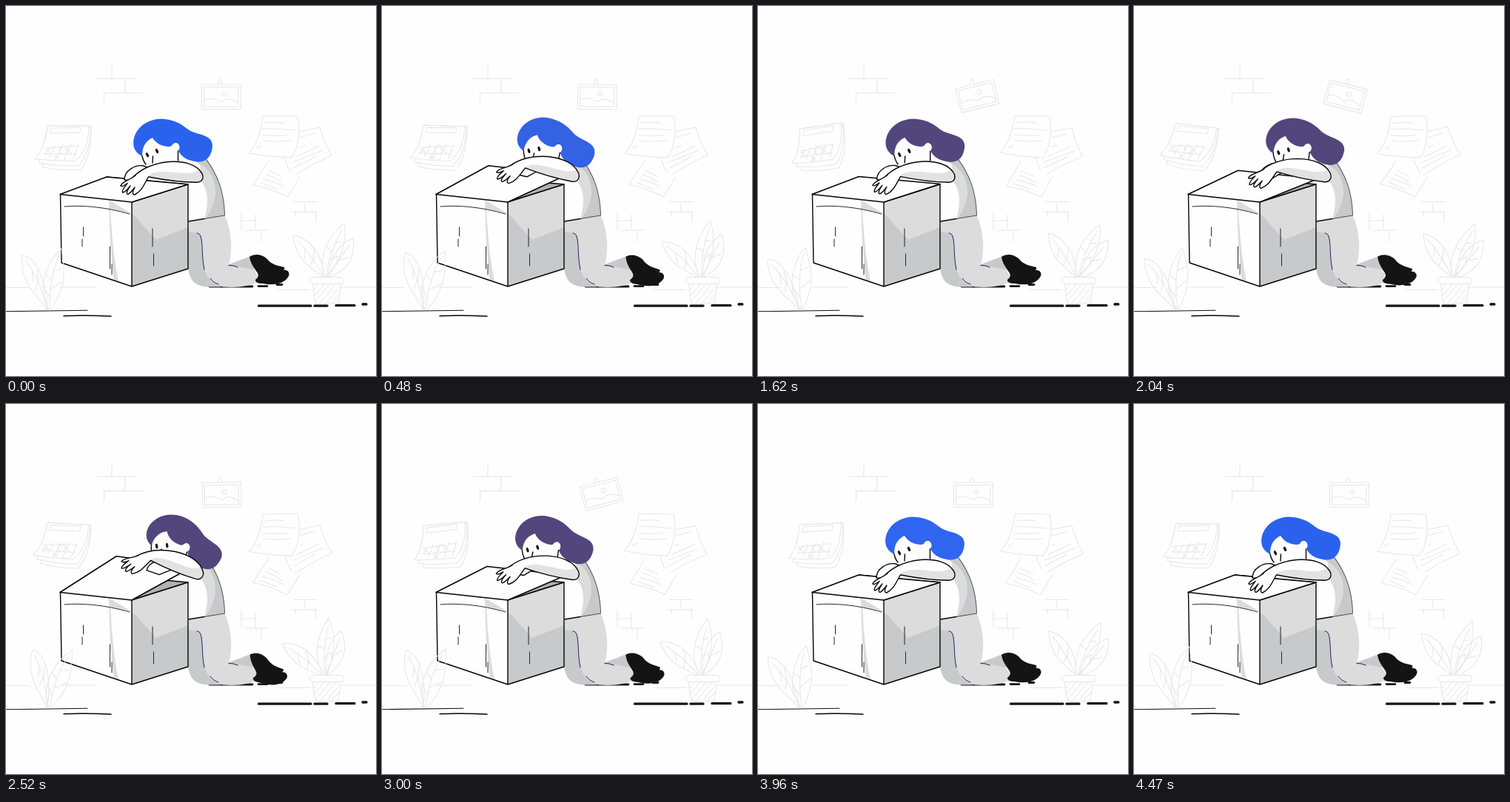
These frames come from a looping animation (500x500 px, 4.53 s). An HTML page:

```html
<!DOCTYPE html>
<html lang="en">
<head>
<meta charset="utf-8">
<title>Resting on a box</title>
<style>
html, body { margin: 0; width: 100%; height: 100%; overflow: hidden; background: #fefefe; }
svg { display: block; width: 100%; height: 100%; }
path, line, circle, rect { stroke-linecap: round; stroke-linejoin: round; }
.faint { fill: none; stroke: #e6e6e6; stroke-width: 1; }
.sheet { fill: #fefefe; }
.ink { fill: none; stroke: #050505; stroke-width: 1.4; }
.thin { fill: none; stroke: #111; stroke-width: .9; }
.white { fill: #fefefe; }
.light { fill: #dcdcdc; stroke: none; }
.dark { fill: #c8c9cb; stroke: none; }
.crease { fill: none; stroke: #1d1768; stroke-width: 1; }
.thick { fill: none; stroke: #151515; stroke-width: 3.3; }
</style>
</head>
<body>
<svg viewBox="0 0 500 500">
  <!-- wall and floor -->
  <g class="faint">
    <path d="M123 98H176M143 80V98M161 98V117M185 117.5H132.500V131"/>
    <path d="M389 264.5H420M404 264.5V278M385 278H420M391 278V284M418.500 278V290"/>
    <path d="M318 280V302M318 290H338M337 282V303M323 303H354M345 303V319"/>
    <path d="M0 380.500H31M74 380H123M367 383.500H410M455 380H500"/>
  </g>

  <g id="calendar" class="faint">
    <path class="sheet" d="M57 162H115C116 188 111 209 101 221.500Q75 223 50 218Z"/>
    <path class="sheet" d="M57 162H114C115 186 108 205 98 216Q70 217 45 212Z"/>
    <path class="sheet" d="M56 162H112C112 185 104 201 94 209Q65 210 39 206.500C49 197 54 180 56 162Z"/>
    <path d="M61 165L101 164L100 171L59 172Z"/>
    <path d="M53 192L98 189M51 200L95 200M66 189L59 204M77 187L66 208M88 187L79 208M98 188L91 206"/>
    <path d="M53 193L60 199M59 192L52 200M66 202L72 208M73 202L66 208M82 192L88 199"/>
    <circle cx="77" cy="195" r="5"/>
  </g>

  <g id="picture" class="faint">
    <path d="M286 106L288 100Q290 97 291 101L292 106"/>
    <rect class="sheet" x="265" y="106" width="52.500" height="33.500"/>
    <rect x="268" y="109.500" width="46" height="26.500"/>
    <circle cx="295" cy="118.500" r="3"/>
    <path d="M268 127Q277 123 285 127T297 126Q305 125 314 131"/>
  </g>

  <g class="faint">
    <g id="page2">
      <path class="sheet" d="M395 170L424 164Q430 185 440 202Q412 214 388 230Q381 220 377 207Z"/>
      <path d="M397 178L417 172M397 191L404 188M392 204L423 189M388 211L428 195M388 219L419 203"/>
    </g>
    <g id="page1">
      <path class="sheet" d="M347 149Q372 148 394 149C399 170 394 194 386 205Q355 204 328 199C340 186 345 167 347 149Z"/>
      <path d="M350 158Q363 156 376 158M347 166Q368 165 391 168M347 174Q363 177 381 174M348 182Q367 184 384 182M339 190L341 193L345 188"/>
    </g>
    <g id="page3">
      <path class="sheet" d="M355 209L334 242Q358 246 381 258L397 231"/>
      <path d="M355 222L372 230M352 228Q364 231 373 239M348 234Q362 237 376 244M345 239L366 247"/>
    </g>
  </g>

  <g class="faint">
    <g id="plantR">
      <path d="M430 367C414 355 392 345 388 310C410 313 428 335 430 367ZM430 366C421 332 440 308 457 293C461 318 454 345 432 366M434 367C439 336 453 320 469 314C473 342 459 360 434 367"/>
      <path d="M430 367Q413 337 394 317M404 328L403 342M415 342L411 352M416 326L416 344M432 366Q438 330 454 303M445 320L453 319M441 332L433 326M438 343L449 338M434 367Q449 345 464 323M451 343L463 340M448 349L447 337"/>
    </g>
    <rect class="sheet" x="410.500" y="366.500" width="46" height="9" rx="4"/>
    <path class="sheet" d="M414 376L418 401Q433 404 449 401L453 376Z"/>
    <path d="M415 384L421 377M417 391L429 377M418 399L437 377M424 402L445 377M432 402L451 380M440 402L450 389"/>
  </g>

  <!-- ground strokes -->
  <path class="thin" style="stroke-width:1.100" d="M0 412.800L110 411.300"/>
  <path class="ink" d="M78 418.700Q110 417.500 142 419.300"/>
  <path class="thick" d="M341.500 405.200H412M417 405.200H434M446 404.700H471M482 403H487"/>
  <path class="thick" style="stroke-width:2.800" d="M275 379H333M341 378.600H353M366 376.500H373"/>

  <!-- legs and torso -->
  <path class="dark" d="M246 291H266L272 352L290 379.500H272C255 379 246 369 246 350Z"/>
  <path class="dark" d="M296 351L331 338L336 357L305 372Z"/>
  <path class="light" d="M246 291L296 283C306 309 306 333 301 350L335 356L344 371C330 379 312 381 294 379.500C276 377 267 362 265 340C264 318 264 309 259 307L246 305Z"/>
  <path class="crease" d="M258 307C268 306 263 333 268 356M276 368Q280 374 287 376M301 350.500Q307 350 313 353"/>
  <path class="white" d="M236 205H270C288 230 295 258 295.500 283L247 291V241L230 230Z"/>
  <path class="dark" d="M250 205L272 207C288 230 295 256 295.500 283L268 288C286 268 286 239 268 218Z"/>
  <path class="light" d="M262 213C290 230 288 266 268 288C274 268 274 249 263 236Z"/>
  <path class="thin" style="stroke-width:.700" d="M270 207C288 230 295 256 295.500 283L268 287.500"/>
  <path class="ink" d="M247 291L268 287.500"/>
  <path id="foot" fill="#141414" d="M329 339C337 334 345 336 352 341C359 350 368 351 376 353C377 355 376 356 375 357C381 356 384 361 382 365C376 376 361 378 347 375C340 375 337 373 337 370C342 366 342 363 338 358C333 351 330 346 329 339Z"/>

  <!-- box -->
  <path class="ink" style="fill:#b0b0b0" d="M170 265L246 241L136 231Z"/>
  <path class="white" d="M73 254.500L170 265V379L75 347Z"/>
  <path class="light" d="M139 262L169 280L141 274C143 310 146 345 152 372L146 370C141 340 140 300 139 262Z"/>
  <path class="dark" d="M170 265L246 241V355L170 379Z"/>
  <path class="light" d="M170 265L246 241V299L203 316L170 280Z"/>
  <path class="ink" d="M73.500 254.500L75 347L170 379L246 355V241L170 265V379"/>
  <path class="thin" d="M79 271C102 269 132 271 167 281"/>
  <path class="thin" d="M104.500 299V311M103 315V325M140.500 325V355M143 349V363M198 301V325M199.500 335V351"/>
  <path id="lid" class="ink" style="fill:#fefefe;stroke-width:1.600"/>

  <!-- head -->
  <g id="head">
    <path class="white" d="M184 196L190 216L233 212V184L198 176Z"/>
    <path class="ink" d="M183.500 201Q185 209 189 214M232.500 196V209M198.500 203L198 212"/>
    <path id="hair" d="M184 203C173 198 169.500 187 174 175C180 160 195 152.500 210 152.500C225 153 235 158 245 166C256 175 279 172 279 189C278 204 270 211.500 258 210.500C246 209 238 205 233 196C236 190 233 185 229 185C225 186 226 190 220 190C210 190 202 185 198 178C190 182 184 188 184 203Z"/>
    <path fill="#fefefe" d="M224 190C225 184 233 183 234.500 190C235 195 231 197 225 195Z"/>
    <ellipse cx="191" cy="201.300" rx="1.700" ry="3.300" transform="rotate(-24 191 201.300)" fill="#111"/>
    <ellipse cx="204" cy="196" rx="1.700" ry="3.300" transform="rotate(-24 204 196)" fill="#111"/>
  </g>

  <!-- arms -->
  <g id="arm">
    <path id="farArm" class="ink" style="fill:#fefefe" d="M160 235C160 222 175 214 186 216Q192 218 196 222L178 236Z"/>
    <path fill="#fefefe" d="M170 233C180 222 195 213 220 210.500C240 209 257 214 264 225C268 231 266 238 258 238.300C236 238 213 235 191 231Z"/>
    <path class="light" style="fill:#e2e2e2" d="M191 231C200 219 228 226 244 226Q255 226 261 221C268 230 266 238 258 238.300C236 238 213 235 191 231Z"/>
    <path class="ink" d="M170 233C180 222 195 213 220 210.500C240 209 257 214 264 225C268 231 266 238 258 238.300C236 238 213 235 193 231"/>
    <path class="ink" style="fill:#fefefe" d="M175 229C166 236 157 237 155 243Q157 245 164 239.500C160 245 156 249 157.500 252Q161 252 168 243C163 250 162 254 165 254.500Q169 252 174 245C170 251 171 255.500 174 255C184 250 187 240 192.500 231"/>
  </g>

  <g id="plantL" class="faint">
    <path d="M55 410C47 394 18 378 22 337C42 340 54 370 56 410M58 410C41 382 55 345 75 328C80 358 82 378 61 410"/>
    <path d="M56 410Q46 370 26 344M36 357L36 372M43 371L40 384M42 355L44 373M59 410Q58 366 72 336M64 358L75 355M61 370L53 362M60 383L75 373M59 393L50 380"/>
  </g>
</svg>
<script>
const LOOP = 4530;
const $ = id => document.getElementById(id);
const mix = (a, b, k) => a + (b - a) * k;
const ease = k => (1 - Math.cos(Math.PI * k)) / 2;

// The pair of [time, value] stops around time t, and the progress between them.
function span(t, stops) {
  let i = 0;
  while (i < stops.length - 2 && t >= stops[i + 1][0]) i++;
  const [a, from] = stops[i], [b, to] = stops[i + 1];
  return { from, to, k: Math.min(1, Math.max(0, (t - a) / (b - a))) };
}
function along(t, stops) {
  const s = span(t, stops);
  return mix(s.from, s.to, ease(s.k));
}
function tint(t) {
  const s = span(t, hairStops);
  return `rgb(${s.from.map((c, i) => Math.round(mix(c, s.to[i], s.k)))})`;
}
const move = (id, value) => $(id).setAttribute('transform', value);
const turn = (id, deg, x, y) => move(id, `rotate(${deg} ${x} ${y})`);

const blue = [42, 98, 238], violet = [82, 70, 124];
const hairStops = [[0, blue], [400, blue], [990, [111, 101, 156]], [1500, violet],
  [3000, violet], [3500, [52, 104, 240]], [4470, blue], [LOOP, blue]];
const pictureStops = [[350, 0], [950, 7.5], [1560, -15], [2100, 15.5], [2900, -15], [3800, 0]];
const calendarStops = [[200, 0], [920, 6], [1570, -8.2], [2120, 7], [3350, -8], [4350, 0]];
const sway = (t, hi, lo) => along(t, [0, hi, lo, hi, lo, 0].map((v, i) => [i * LOOP / 5, v]));

function draw(t) {
  const lift = t < 3400 ? 1.03 * ease(t / 850) : 0;
  const swing = along(t, calendarStops);

  turn('picture', along(t, pictureStops), 290, 101);
  turn('calendar', swing, 85, 161);
  turn('page1', -.15 * swing, 372, 149);
  turn('page2', -.22 * swing, 395, 165);
  turn('page3', .3 * swing, 375, 205);
  turn('plantL', sway(t, 13, -10), 57, 410);
  turn('plantR', sway(t, -18, 6.5), 433, 370);

  const dx = 12.8 * lift, dy = -24.6 * lift;
  $('lid').setAttribute('d',
    `M73 254.5L170 265L${246 + .5 * dx} ${241 + .85 * dy}L${136 + dx} ${231 + dy}Z`);
  move('head', `translate(${13 * lift} ${-7 * lift}) rotate(${17.5 * lift} 197 198)`);
  turn('arm', 15.5 * lift, 264, 232);
  move('farArm', `translate(${30 * lift} ${10 * lift})`);
  turn('foot', 7 * lift, 333, 345);
  $('hair').setAttribute('fill', tint(t));
}

const start = performance.now();
function tick() {
  draw((performance.now() - start) % LOOP);
  requestAnimationFrame(tick);
}
tick();
</script>
</body>
</html>
```
